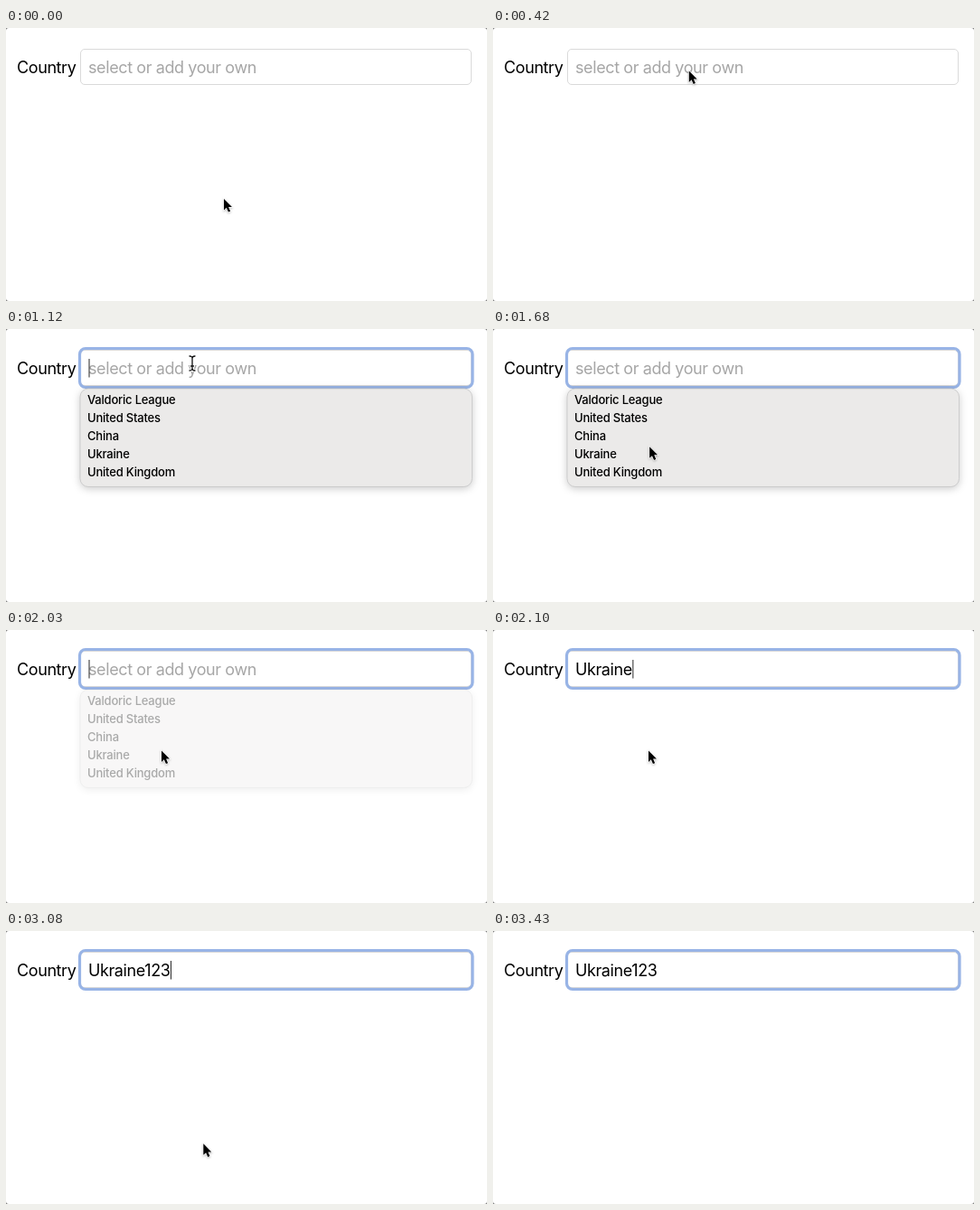
Recreate the animation shown at these times as an HTML page. Size 532 by 302 pixels, loop 3.78 s.

```html
<!DOCTYPE html>
<html lang="en">
<head>
<meta charset="utf-8">
<title>Country field</title>
<style>
  html, body { margin: 0; width: 100%; height: 100%; overflow: hidden; background: #777; }
  svg { display: block; width: 532px; height: 302px; }
  text { font-family: Inter, "Liberation Sans", sans-serif; }
  .field { font-size: 18px; letter-spacing: -.4px; }
  #menu { filter: drop-shadow(0 2px 4px #0003); }
  #menu text { font-size: 13px; font-weight: 500; letter-spacing: -.2px; }
  #arrow path { filter: drop-shadow(0 1px 1px #0004); }
</style>
</head>
<body>
<svg viewBox="0 0 532 302">
  <defs>
    <path id="ibeam" d="M-3 -8Q0 -8 0 -5.5Q0 -8 3 -8M0 -6V6M-3 8Q0 8 0 5.5Q0 8 3 8M-1.5 3H1.5" fill="none" stroke-linecap="round"/>
  </defs>
  <rect width="532" height="302" rx="3" fill="#fff"/>
  <text class="field" x="12" y="50">Country</text>
  <rect x="82.5" y="23.5" width="432" height="39" rx="4.5" fill="#fff" stroke="#dadada"/>
  <rect id="ring" x="81.5" y="21.5" width="434.5" height="43" rx="6.5" fill="none" stroke="#98b4e6" stroke-width="3.2"/>
  <text class="field" id="value" x="91" y="50"></text>
  <rect id="caret" y="33" width="1" height="20.5"/>
  <g id="menu">
    <rect x="82" y="66" width="433.5" height="108.5" rx="9" fill="#ebeae9" stroke="#c6c6c6" stroke-width=".8"/>
  </g>
  <g id="arrow">
    <path transform="scale(.88)" d="M0 0V14.2L3.2 11.2L5.6 16.6L8.1 15.5L5.8 10.3H10.2Z" stroke="#fff" stroke-width="1.4" paint-order="stroke"/>
  </g>
  <g id="beam">
    <use href="#ibeam" stroke="#fff" stroke-width="3"/>
    <use href="#ibeam" stroke="#111" stroke-width="1.3"/>
  </g>
</svg>
<script>
const LOOP = 3780, STEP = 70;
const FOCUS = 910, OPEN = 1120, PICK = 2100, TYPE = 2730, KEY_GAP = 105, BLINK = 490;
const EXTRA = "123";

const [ring, value, caret, menu, arrow, beam] =
  ["ring", "value", "caret", "menu", "arrow", "beam"].map(id => document.getElementById(id));

["Valdoric League", "United States", "China", "Ukraine", "United Kingdom"].forEach((name, i) => {
  const item = document.createElementNS("http://www.w3.org/2000/svg", "text");
  item.setAttribute("x", 90);
  item.setAttribute("y", 83 + 20 * i);
  item.textContent = name;
  menu.append(item);
});

// Pointer stops and the ease-out power per axis of the move to each
const home = [241, 189];
const moves = [
  { start: 0, end: 560, to: [206, 38], power: [.85, 2] },
  { start: 1400, end: 1890, to: [172, 133.5], power: [4, 4] },
  { start: TYPE, end: 3430, to: [250, 305], power: [1.3, 1.3] }
];
const ramp = (t, a, b) => Math.min(1, Math.max(0, (t - a) / (b - a)));

const pointer = t => moves.reduce((pos, { start, end, to, power }) =>
  pos.map((p, axis) => to[axis] + (p - to[axis]) * (1 - ramp(t, start, end)) ** power[axis]), home);

function typed(t) {
  if (t < PICK) return "";
  return "Ukraine" + EXTRA.slice(0, Math.max(0, Math.floor((t - TYPE) / KEY_GAP) + 1));
}

// Each edit restarts the blink
const edits = [FOCUS, PICK, ...[...EXTRA].map((_, i) => TYPE + i * KEY_GAP)];
function caretOn(t) {
  const last = edits.findLast(at => at <= t);
  return last !== undefined && (t - last) % (2 * BLINK) < BLINK;
}

function draw(now) {
  const t = Math.floor(now % LOOP / STEP) * STEP;
  const text = typed(t);
  value.textContent = text || "select or add your own";
  value.setAttribute("fill", text ? "#000" : "#a6a6a6");
  caret.setAttribute("x", 91.5 + (text ? value.getComputedTextLength() : 0));
  caret.setAttribute("opacity", caretOn(t) ? .85 : 0);
  ring.setAttribute("opacity", ramp(t, 770, 980));
  menu.setAttribute("opacity", t < OPEN ? 0 : 1 - ramp(t, 1890, PICK));

  const isBeam = t >= 490 && t < 1470;
  const place = `translate(${pointer(t)})`;
  for (const [shape, shown] of [[arrow, !isBeam], [beam, isBeam]]) {
    shape.setAttribute("transform", place);
    shape.setAttribute("opacity", shown ? 1 : 0);
  }
}

const start = performance.now();
function tick() {
  draw(performance.now() - start);
  requestAnimationFrame(tick);
}
tick();
</script>
</body>
</html>
```
